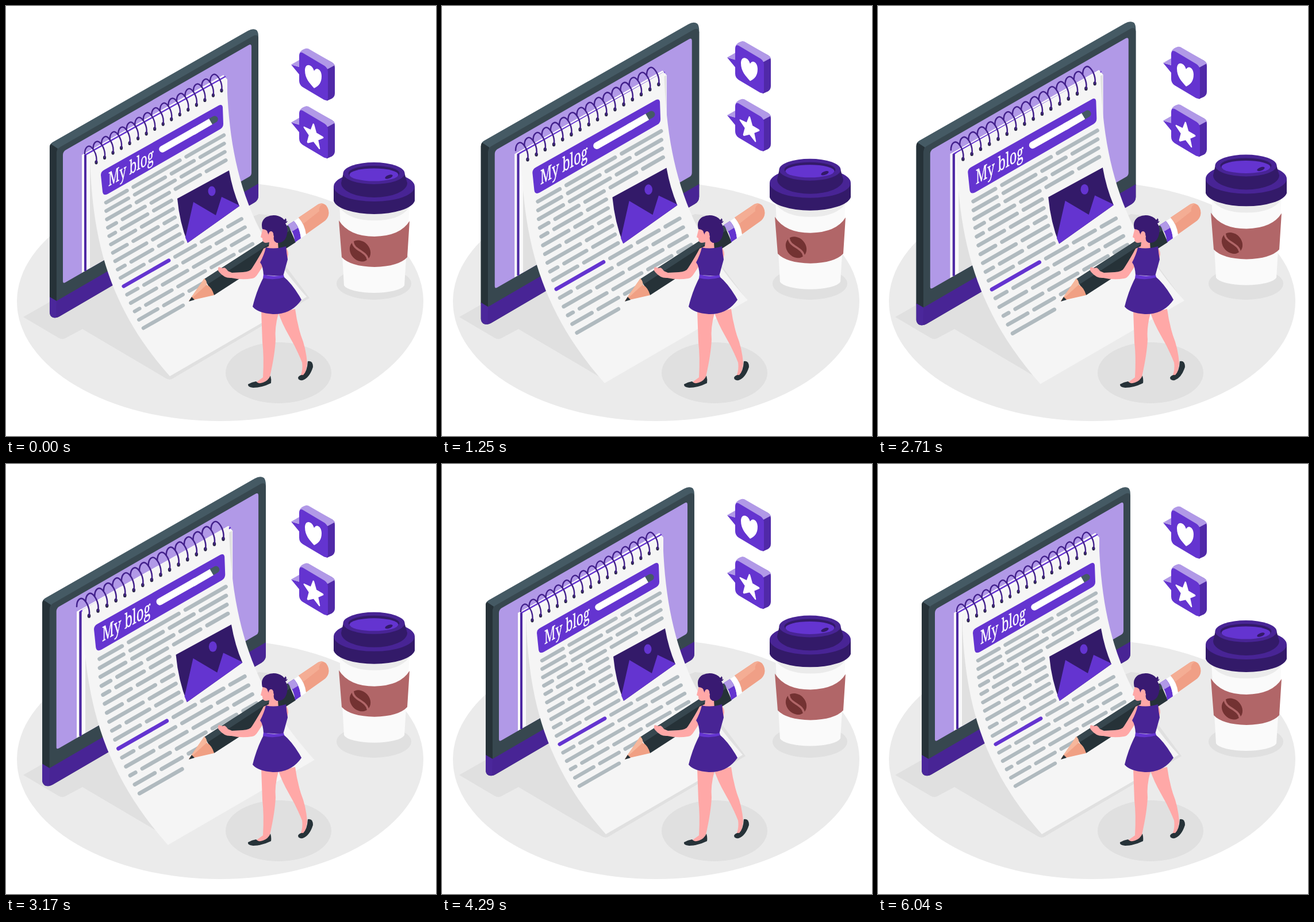
Animation of 748x748 px, one loop 6080 ms. Source, as an HTML page:

```html
<!DOCTYPE html>
<html lang="en">
<head>
<meta charset="utf-8">
<title>My blog</title>
<style>
  html, body { margin: 0; width: 100%; height: 100%; overflow: hidden; background: #fff; }
  svg { display: block; width: 748px; height: 748px; }
  .ink { fill: #6434d0; }
  .mid { fill: #482495; }
  .deep { fill: #331a69; }
  .pale { fill: #b199e7; }
  .slate { fill: #37474f; }
  .dark { fill: #263238; }
  .paper { fill: #f5f5f5; }
  .skin { fill: #ffa8a7; }
  .shade { fill: #e0e0e0; }
  .line { fill: none; stroke-linecap: round; stroke-linejoin: round; }
</style>
</head>
<body>
<svg viewBox="0 0 748 748">
  <ellipse cx="372.5" cy="514" rx="353.5" ry="208" fill="#ebebeb"/>
  <g class="shade">
    <path d="M30 541L130 484L440 362L470 365L470 430L528 508L290 648Q284 652 277 647L133 562L103 578Q97 581 91 577Z"/>
    <ellipse cx="474" cy="638" rx="92" ry="53"/>
    <ellipse cx="640" cy="483" rx="65" ry="28"/>
  </g>

  <g id="monitor">
    <path fill="#455a64" d="M76 246Q76 240 81 237L421 43Q430 38 436 42Q439 45 439 54V330Q439 338 432 342L93 540Q86 544 80 541Q76 538 76 533Z"/>
    <path class="dark" d="M76 246Q76 242 78 240L90 248L88 256V515L76 508Z"/>
    <path class="slate" d="M88 256Q88 249 93 246L430 52Q438 48 439 56V311L88 514Z"/>
    <path fill="#4b279b" d="M76 506L88 513V542Q83 543 80 541Q76 538 76 533Z"/>
    <path class="mid" d="M88 513L439 309V330Q439 338 432 342L93 540Q90 542 87 542Z"/>
    <path class="pale" d="M99 259Q99 254 103 251L422 68Q427 65 427 71V290Q427 295 423 297L103 481Q99 483 99 479Z"/>

    <path fill="#fafafa" d="M132 259L378 120L385 128V319L132 464Z"/>
    <path class="shade" d="M146 262L384 128V319L146 456Z"/>
    <path class="line" stroke="#6434d0" stroke-width="2.5" d="M138 259L381 123"/>
    <path fill="none" stroke="#4d28a3" stroke-width="4" d="M138 259V461"/>
  </g>

  <g id="notebook">
    <path class="paper" d="M146 262L384 126C388 264 413 384 523 506L285 644C175 520 150 400 146 262Z"/>

    <path class="ink" d="M165 294Q165 288 171 285L370 173Q376 170 377 176L378 205Q378 211 373 214L177 327Q169 331 168 323Z"/>
    <text transform="matrix(.63 -.35 0 1 178 314)" font-family="'Noto Serif', serif" font-size="33" fill="#fff" stroke="#fff" stroke-width=".4">My blog</text>
    <path class="line" stroke="#455a64" stroke-width="11.5" d="M330 216L363 197"/>
    <path class="line" stroke="#fff" stroke-width="11.5" d="M272 249L330 216"/>
    <path fill="none" stroke="#fff" stroke-width="11.5" d="M325 219L356 201"/>

    <g id="rows" class="line" stroke-width="6.4"></g>

    <path class="deep" d="M298 335L388 286Q394 320 406 348L316 412Q302 377 298 335Z"/>
    <path class="ink" d="M312 403L326 341L365 364L375 332L404 346L406 348L316 412Z"/>
    <ellipse class="ink" cx="358" cy="322" rx="6.5" ry="8.5"/>
    <g id="rings"></g>
  </g>

  <g id="pencil">
    <path class="dark" d="M345 475L491 381L504 411L362 503Z"/>
    <path class="slate" d="M345 475L491 381L495 390L351 484Z"/>
    <path fill="#f0a084" d="M318 513L345 474Q350 479 349 485Q358 489 362 503Z"/>
    <path fill="#f6b79c" d="M318 513L345 474Q350 479 349 485Z"/>
    <path class="dark" d="M318 514L323 506L328 511Z"/>
    <path class="ink" d="M490 381L501 374Q511 385 513 404L503 411Q501 393 490 381Z"/>
    <path class="pale" d="M490 381L501 374Q505 379 508 386L498 392Q494 385 490 381Z"/>
    <path fill="#fff" d="M501 374L509 369Q519 380 522 398L513 404Q511 385 501 374Z"/>
    <path fill="#f09f86" d="M509 368L543 345Q551 341 557 347Q563 355 561 364Q559 371 553 375L522 397Q520 380 509 368Z"/>
    <path fill="#f4ad94" d="M509 368L543 345Q548 342 552 344Q543 348 545 357L517 379Q514 373 509 368Z"/>
  </g>

  <g id="writer">
    <g class="skin">
      <path d="M474 534L503 527Q506 550 513 573Q522 595 524 622L520 643L511 646Q517 635 515 620Q505 595 492 573Q480 552 474 534Z"/>
      <path d="M444 530L474 534Q467 560 469 580Q468 605 459 645L452 657L429 659L447 646Q449 610 446 585Z"/>
      <path d="M486 420Q491 424 491 432L488 446Z"/>
    </g>
    <g class="dark">
      <path d="M525 618Q534 616 534 628Q528 647 516 651Q508 652 508 646Q512 641 517 642Q524 635 525 618Z"/>
      <path d="M460 643Q462 650 461 656Q445 664 430 664Q420 663 421 658Q428 654 435 653Q439 658 447 655Q456 652 460 643Z"/>
    </g>
    <path class="skin" d="M448 382L443 402L446 404Q446 412 452 412L458 411L457 418L448 422Q442 434 428 456Q425 462 412 463L393 464L386 461Q381 453 377 456L370 454Q367 459 371 463Q380 474 392 473Q410 477 428 474Q434 473 438 466L452 445L474 426L472 396Z"/>
    <path class="mid" d="M452 420Q468 424 487 418Q488 430 490 441L482 470L448 468Q447 452 442 446Q449 433 452 420Z"/>
    <path class="mid" d="M449 470Q436 494 429 523Q438 534 464 536Q496 537 514 511Q499 484 482 470Z"/>
    <path class="ink" d="M448 467Q465 472 483 468L484 472Q465 478 447 473Z"/>
    <path fill="#391a72" d="M446 388Q442 374 453 367Q468 360 481 369L484 372Q486 371 486 369Q489 372 487 375L490 374Q489 377 486 378Q491 385 489 396Q486 413 471 412Q464 409 466 400Q460 391 457 398L455 394Q455 389 446 388Z"/>
    <ellipse class="skin" cx="461" cy="398" rx="4.2" ry="6.2"/>
  </g>

  <g id="cup">
    <path fill="#fafafa" d="M580 345H702L693 486A53 15 0 0 1 588 486Z"/>
    <path fill="#ebebeb" d="M580 345H702L701 351Q685 373 641 373Q597 373 581 351Z"/>
    <path fill="#b16668" d="M579 373Q597 401 641 401Q686 400 702 374L698 437Q683 453 641 454Q599 453 584 437Z"/>
    <g transform="translate(616 426) rotate(-42)">
      <ellipse rx="16.5" ry="20" fill="#733232"/>
      <path class="line" stroke="#b16668" stroke-width="3.5" d="M1 -20C-8 -9 8 7 0 20"/>
    </g>
    <path class="deep" d="M570 314H711V339A71 26 0 0 1 570 339Z"/>
    <ellipse class="mid" cx="640.5" cy="314" rx="70.5" ry="26"/>
    <path class="deep" d="M587 290L583 308A57.5 25 0 0 0 698 308L693 290Z"/>
    <ellipse class="mid" cx="640" cy="291" rx="53.5" ry="19"/>
    <ellipse class="deep" cx="640" cy="291" rx="44.5" ry="13"/>
    <ellipse class="ink" cx="640" cy="293.5" rx="42.5" ry="11"/>
    <ellipse class="deep" cx="666" cy="297" rx="7" ry="3" transform="rotate(-20 666 297)"/>
  </g>

  <g id="bubbles">
    <g id="bubble">
      <path fill="#5029a8" d="M511 82L523 74L567 98Q572 101 572 107V152Q572 158 567 161L558 165Z"/>
      <path class="pale" d="M511 81Q514 76 521 74Q525 73 529 76L567 98Q571 100 572 103L559 110Z"/>
      <path class="ink" d="M510 87Q510 78 517 82L554 104Q560 108 560 115V160Q560 166 553 163L516 141Q510 137 510 130V119L496 102L510 106Z"/>
      <path class="pale" d="M496 102L510 94V106Z"/>
    </g>
    <use href="#bubble" y="100.5"/>
    <path fill="#fff" d="M536 113C532 100 520 99 520 112C520 126 528 134 536 143C544 139 549 134 549 122C549 111 540 105 536 113Z"/>
    <path id="star" fill="#fff" stroke="#fff" stroke-width="3" stroke-linejoin="round" transform="matrix(.85 .45 0 1 535 226)"/>
  </g>
</svg>
<script>
const $ = id => document.getElementById(id);
const SLOPE = .572;

// Inner gaps of each text row, as x offsets from its left end
const gaps = [
  [42, 134], [44, 108, 158], [46, 124], [20, 70, 112, 166],
  [16, 72], [48], [30, 84], [60], [18, 66], [46],
  [84, 130, 176], [24, 92, 150], [50, 104, 170], [14, 70, 128, 178], [38, 82], []
];

const stroke = (x, y, from, to, color) =>
  `<path stroke="${color}" d="M${x + from} ${y - from * SLOPE}L${x + to} ${y - to * SLOPE}"/>`;

$('rows').innerHTML = gaps.map((cuts, k) => {
  const x = 174 + 65 * (k / 15) ** 1.85, y = 342 + 14.55 * k;
  const end = k == 15 ? 69 : k == 14 ? 115 : k > 3 && k < 10 ? 108 : 205;
  const stops = [-5.5, ...cuts, end + 5.5];
  return cuts.concat(end).map((_, i) => stroke(x, y, stops[i] + 5.5, stops[i + 1] - 5.5,
    k == 10 && i == 0 ? '#6434d0' : '#b0babf')).join('');
}).join('');

$('rings').innerHTML = Array.from({ length: 16 }, (_, i) =>
  `<g transform="translate(${157 + 14.53 * i} ${272 - 8.33 * i})">
    <ellipse rx="2.6" ry="3.4" fill="#2b2748"/>
    <path class="line" stroke="#43218c" stroke-width="2.4" d="M-20 -15C-20 -27 -13 -31 -8 -26C-2 -20 2 -9 0 0"/>
  </g>`).join('');

$('star').setAttribute('d', 'M' + Array.from({ length: 10 }, (_, i) => {
  const r = i % 2 ? 8.5 : 20, a = i * Math.PI / 5;
  return [r * Math.sin(a), -r * Math.cos(a)].map(v => v.toFixed(1));
}).join('L') + 'Z');

// Piecewise linear double beat over the six second cycle
function beat(p) {
  if (p < .1) return p / .1;
  if (p < .3) return (.3 - p) / .2;
  if (p < .4) return 0;
  return Math.max(0, 1 - Math.abs(p - .5) / .1);
}

// Linear rise and fall by 15 pixels
const float = p => -15 * (1 - Math.abs(1 - 2 * p));

const move = (id, value) => $(id).setAttribute('transform', value);
const zoom = (id, s, x, y) =>
  move(id, `translate(${x} ${y}) scale(${s}) translate(${-x} ${-y})`);

function draw(now) {
  const p = Math.min(now % 6080 / 6000, 1);
  const scale = 1 + .1 * beat(p);
  zoom('monitor', scale, 257.5, 290.6);
  zoom('notebook', scale, 332.5, 382);
  move('bubbles', `translate(0 ${float(p * 2 % 1)})`);
  move('cup', `translate(0 ${float(p)})`);
}

const start = performance.now();
function tick() {
  draw(performance.now() - start);
  requestAnimationFrame(tick);
}
tick();
</script>
</body>
</html>
```
